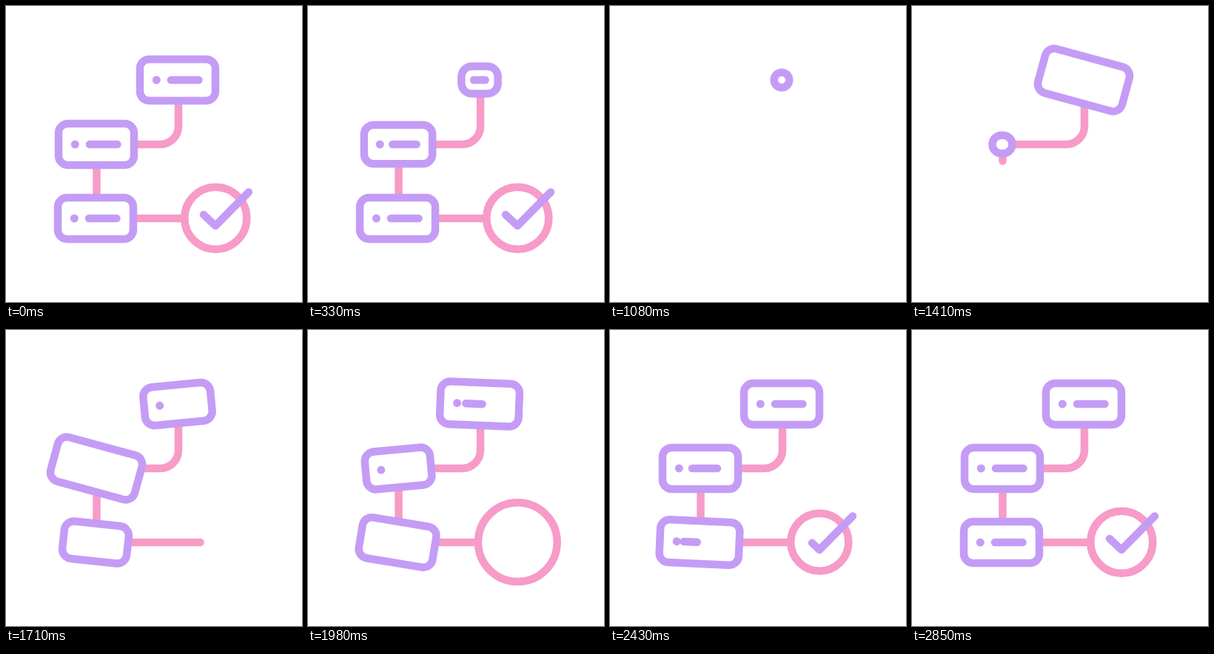
Animation of 400x400 px, one loop 2910 ms. Source, as an HTML page:

```html
<!DOCTYPE html>
<html lang="en">
<head>
<meta charset="utf-8">
<title>Workflow</title>
<style>
  html, body { margin: 0; width: 100%; height: 100%; overflow: hidden; background: #fff; }
  svg { display: block; width: 100vw; height: 100vh; }
  .purple { stroke: #c49cf5; }
  .pink { stroke: #f79bc8; }
</style>
</head>
<body>
<svg id="stage" viewBox="0 0 400 400" fill="none" stroke-width="10.5" stroke-linecap="round" stroke-linejoin="round"></svg>
<script>
const LOOP = 2910, STEP = 30, RING = 30;
const stage = document.getElementById('stage');

function add(parent, tag, attrs = {}) {
  const el = document.createElementNS('http://www.w3.org/2000/svg', tag);
  set(el, attrs);
  return parent.appendChild(el);
}
function set(el, attrs) {
  for (const name in attrs) el.setAttribute(name, attrs[name]);
}
function show(el, visible) {
  el.style.display = visible ? '' : 'none';
}

const clamp = u => Math.min(1, Math.max(0, u));
const span = (t, start, length) => clamp((t - start) / length);
const smooth = u => u * u * (3 - 2 * u);
const easeOut = u => 1 - (1 - u) ** 3;

// Smooth interpolation through [time, value] pairs.
function track(keys, t) {
  if (t <= keys[0][0]) return keys[0][1];
  for (let i = 1; i < keys.length; i++) {
    const [t0, v0] = keys[i - 1], [t1, v1] = keys[i];
    if (t < t1) return v0 + (v1 - v0) * smooth((t - t0) / (t1 - t0));
  }
  return keys[keys.length - 1][1];
}

const SPRING = [[1080, 0], [1340, 1.3], [1620, .78], [1910, 1.08], [2150, 1]];
const SWING = [[1110, 0], [1390, 15.5], [1700, -5.5], [1930, 2.6], [2150, 0]];
const RADIUS = [[1760, 0], [2020, 57], [2330, 37], [2600, 43.5], [2840, 42]];

const links = [
  { d: 'M233 100V162.500A24.500 24.500 0 0 1 208.500 187H122', leave: 270, leaveFor: 470, enter: 1110, enterFor: 270 },
  { d: 'M122.500 187V287', leave: 460, leaveFor: 450, enter: 1330, enterFor: 260 },
  { d: 'M121 287H283', leave: 580, leaveFor: 440, enter: 1500, enterFor: 270 }
];
for (const link of links) {
  link.el = add(stage, 'path', { d: link.d, class: 'pink', pathLength: 1 });
}

const cards = [
  { x: 232, y: 100, leave: 0, delay: 0 },
  { x: 122, y: 187, leave: 215, delay: 300 },
  { x: 121, y: 287, leave: 455, delay: 480 }
];
for (const card of cards) {
  card.el = add(stage, 'g', { class: 'purple' });
  card.frame = add(card.el, 'rect', { fill: '#fff' });
  card.dot = add(card.el, 'path');
  card.line = add(card.el, 'path');
}

const circle = add(stage, 'circle', { cx: 283.3, cy: 286.7, class: 'pink', fill: '#fff' });
const tick = add(stage, 'path', { d: 'M267 282L283 297L328 251.500', class: 'purple', pathLength: 1 });

function trim(el, from, to) {
  show(el, to - from > .001);
  set(el, { 'stroke-dasharray': `${to - from} 9`, 'stroke-dashoffset': -from });
}

function drawCard(card, t) {
  const leaving = t < 1050;
  const local = leaving ? t - card.leave : t - card.delay;
  show(card.el, leaving ? local < 540 : local >= 1060);

  const scale = leaving ? 1 - smooth(span(local, 0, 500)) : track(SPRING, local);
  const ring = leaving
    ? RING - 12 * span(local, 420, 120)
    : 18 + 12 * span(local, 1055, 120);
  const width = ring + 72 * scale, height = ring + 26 * scale;
  const turn = leaving ? 0 : track(SWING, local);
  set(card.el, { transform: `translate(${card.x} ${card.y}) rotate(${turn})` });
  set(card.frame, {
    x: -width / 2, y: -height / 2, width, height,
    rx: Math.min(12.5 + 2 * (1 - clamp(scale)), height / 2)
  });

  const dotSize = leaving ? clamp(scale * 8) : span(local, 1560, 90);
  const grow = leaving ? 1 : easeOut(span(local, 1860, 500));
  const dotX = -28.7 * scale;
  show(card.dot, dotSize > 0);
  show(card.line, dotSize > 0 && grow > 0);
  set(card.dot, { d: `M${dotX} 0h.01`, 'stroke-width': 11 * dotSize });
  set(card.line, {
    d: `M${dotX + 19.7 * scale * grow} 0H${dotX + 57.2 * scale * grow}`,
    'stroke-width': 10.5 * dotSize
  });
}

function draw(t) {
  const leaving = t < 1050;
  for (const link of links) {
    if (leaving) trim(link.el, smooth(span(t, link.leave, link.leaveFor)), 1);
    else trim(link.el, 0, smooth(span(t, link.enter, link.enterFor)));
  }
  for (const card of cards) drawCard(card, t);

  const r = leaving ? 42 * (1 - smooth(span(t, 560, 480))) : track(RADIUS, t);
  show(circle, r > .5);
  set(circle, { r });

  if (leaving) trim(tick, 0, 1 - smooth(span(t, 520, 500)));
  else trim(tick, 1 - easeOut(span(t, 2160, 500)), 1);
}

const begin = performance.now();
function tickFrame() {
  const t = Math.max(0, performance.now() - begin) % LOOP;
  draw(Math.min(2850, Math.floor(t / STEP) * STEP));
  requestAnimationFrame(tickFrame);
}
tickFrame();
</script>
</body>
</html>
```
